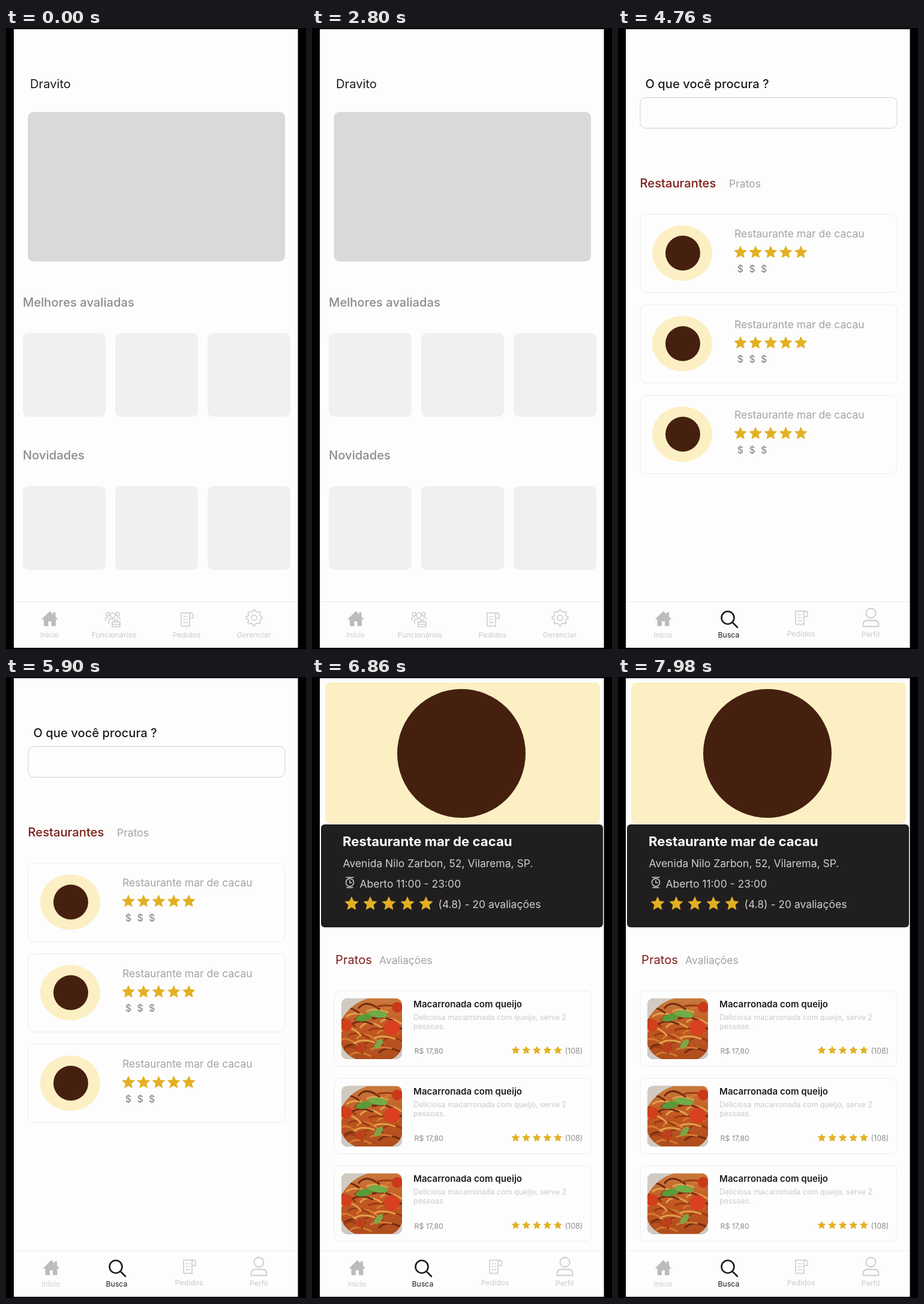
These frames come from a looping animation (500 px wide and 1032 px high, 8000 ms). An HTML page:

```html
<!DOCTYPE html>
<html lang="pt-BR">
<head>
<meta charset="utf-8">
<title>Aplicativo de restaurantes</title>
<style>
  html, body { margin: 0; width: 100%; height: 100%; overflow: hidden; background: #000; }
  svg { display: block; width: 500px; height: 1032px; }
  text { font-family: Inter, "Open Sans", sans-serif; }
</style>
</head>
<body>
<svg id="stage" viewBox="0 0 500 1032"></svg>
<script>
const INK = '#1c1c1c', GRAY = '#8c8c8c', SOFT = '#a3a3a3', PALE = '#cacaca';
const LINE = '#ebebeb', GOLD = '#e2b022', SILVER = '#cfcfcf', CREAM = '#fcefc3';
const LOGO = '#45200f', RED = '#7c1f18';
const PLACE = 'Restaurante mar de cacau';

const text = (x, y, s, size, fill, weight = 400, anchor = 'start') =>
  `<text x="${x}" y="${y}" font-size="${size}" fill="${fill}" font-weight="${weight}" text-anchor="${anchor}">${s}</text>`;
const box = (x, y, w, h, fill, stroke = 'none', r = 9) =>
  `<rect x="${x}" y="${y}" width="${w}" height="${h}" rx="${r}" fill="${fill}" stroke="${stroke}"/>`;
const circle = (x, y, r, fill) => `<circle cx="${x}" cy="${y}" r="${r}" fill="${fill}"/>`;
const group = (x, y, body) => `<g transform="translate(${x} ${y})">${body}</g>`;
const outline = (d, stroke, width = 1.5) =>
  `<path d="${d}" fill="none" stroke="${stroke}" stroke-width="${width}" stroke-linecap="round" stroke-linejoin="round"/>`;
const ring = (x, y, r) => `M${x - r} ${y}a${r} ${r} 0 1 1 ${2 * r} 0a${r} ${r} 0 1 1 ${-2 * r} 0`;
const repeat = (n, f) => Array.from({ length: n }, (_, i) => f(i)).join('');

function star(x, y, r) {
  const points = repeat(10, i => {
    const a = i * Math.PI / 5, k = i % 2 ? r * 0.46 : r;
    return `${(x + k * Math.sin(a)).toFixed(1)},${(y - k * Math.cos(a)).toFixed(1)} `;
  });
  return `<polygon points="${points}" fill="${GOLD}" stroke="${GOLD}" stroke-linejoin="round"/>`;
}
const stars = (x, y, step, r) => repeat(5, i => star(x + i * step, y, r));

function gear() {
  const points = repeat(48, i => {
    const a = i * Math.PI / 24, r = 11.8 + 1.8 * Math.tanh(2 * Math.cos(8 * a));
    return `${i ? 'L' : 'M'}${(r * Math.cos(a)).toFixed(1)} ${(r * Math.sin(a)).toFixed(1)}`;
  });
  return outline(points + 'Z' + ring(0, 0, 4.5), PALE);
}

const house = '<path d="M-13 1L0-12L6-6V-10H9V-3L13 1H9.500V12H3V4H-3V12H-9.500V1Z" fill="#bcbcbc" stroke="#bcbcbc" stroke-linejoin="round"/>';
const receipt = outline('M-9-11H7Q11-11 11-7V-2H5V12L2 10L-1 12L-4 10L-7 12L-9 10ZM5-2V-8Q5-11 8-11M-5-5H-3M0-5H1M-5 0H-3M0 0H1M-5 5H1', PALE);
const search = outline(ring(-2, -2, 10.5) + 'M6 6L14 14', INK, 2.6);
const person = outline(ring(0, -7, 8) + 'M-13 15V12Q-13 5-6 5H6Q13 5 13 12V15Z', PALE, 1.8);
const team = outline(ring(0, -6, 4) + ring(-8, -8, 3) + ring(8, -8, 3) +
  'M-7 8V4Q-7 0-3 0H3M-12 3V0Q-12-3-8-3M8-3Q12-3 12 1M-1 5H12V13H-1ZM3 5V2H8V5M-1 9H12', PALE);

const label = (x, y, s, fill = PALE) => text(x, y, s, 12.3, fill, 400, 'middle');
const rule = `<path d="M14 953.500H486" stroke="${LINE}"/>`;

const homeNav = rule +
  group(73, 981.5, house) + group(178, 982, team) + group(301, 983, receipt) + group(413.5, 980, gear()) +
  label(72.5, 1013, 'Início') + label(180, 1013, 'Funcionários') +
  label(301, 1013, 'Pedidos') + label(413, 1013, 'Gerenciar');

const searchNav = rule +
  group(75.5, 981.5, house) + group(185, 982, search) + group(305, 980, receipt) + group(421.5, 979.5, person) +
  label(75, 1013, 'Início') + label(184.5, 1013, 'Busca', INK) +
  label(305, 1011, 'Pedidos') + label(421, 1012, 'Perfil');

const tiles = y => repeat(3, i => box(28 + 154 * i, y, 138, 139, '#f0f0ef'));

const home =
  text(40, 99.5, 'Dravito', 20.2, INK) +
  box(36.5, 139.5, 428.5, 248.5, '#d9d9d9') +
  text(28, 463, 'Melhores avaliadas', 20.2, GRAY, 500) + tiles(507) +
  text(28, 717, 'Novidades', 20.2, GRAY, 500) + tiles(761.5) + homeNav;

const place = i => group(0, 150.5 * i,
  box(37, 309.5, 428, 130, 'none', LINE) +
  `<ellipse cx="107" cy="374" rx="50" ry="46" fill="${CREAM}"/>` +
  circle(108, 374, 29, LOGO) +
  text(194, 348, PLACE, 17.5, SOFT) +
  stars(204, 373, 25.2, 10.5) +
  repeat(3, n => text(204 + 19.6 * n, 405.5, '$', 16, GRAY, 500, 'middle')));

const results =
  text(45.5, 99.5, 'O que você procura ?', 20.2, INK, 500) +
  box(37, 115.5, 428, 51, 'none', '#d0d0d0') +
  text(36.5, 264.5, 'Restaurantes', 20.2, RED, 500) +
  text(185, 264.5, 'Pratos', 17.6, SOFT) +
  repeat(3, place) + searchNav;

// Plate of pasta: a warm gradient with noodles, tomatoes and basil
const leaf = (x, y, rx, ry, turn, fill) =>
  `<ellipse rx="${rx}" ry="${ry}" fill="${fill}" transform="translate(${x} ${y}) rotate(${turn})"/>`;
const noodle = i => {
  const x = (i * 37) % 91, y = 12 + (i * 23) % 83;
  return outline(`M${x - 14} ${y}q12 ${-18 + i % 5 * 3} 34 ${i % 7 - 2}`,
    ['#e2a04c', '#9c3914', '#d47a30', '#702a10'][i % 4], 3);
};
const defs = `<defs>
  <linearGradient id="sauce" x2="0" y2="1"><stop stop-color="#c87a3c"/><stop offset=".5" stop-color="#c25722"/><stop offset="1" stop-color="#ad4d1c"/></linearGradient>
  <clipPath id="frame"><rect width="101" height="101" rx="10"/></clipPath>
  <g id="dish" clip-path="url(#frame)">
    <rect width="101" height="101" fill="url(#sauce)"/>
    ${repeat(30, noodle)}
    <path d="M0 0H45Q16 8 0 36ZM0 77Q6 94 24 101H0ZM101 82Q97 95 84 101H101Z" fill="#d0cac2"/>
    ${circle(84, 49, 13, '#d8401f')}${circle(8, 45, 10, '#d0401c')}${circle(93, 15, 9, '#cc381a')}${circle(32, 82, 8, '#bd401c')}
    ${leaf(38, 32, 14, 6, -12, '#5a9a3a')}${leaf(61, 26, 16, 6, 8, '#72ab48')}${leaf(62, 76, 10, 5, -50, '#7ba548')}
  </g></defs>`;

const dish = i => group(0, 145.4 * i,
  box(37, 521.5, 428, 125.5, 'none', LINE) +
  '<use href="#dish" x="49" y="534"/>' +
  text(169, 548.5, 'Macarronada com queijo', 15.1, INK, 600) +
  text(169, 569.5, 'Deliciosa macarronada com queijo, serve 2', 12.5, PALE) +
  text(169, 584.5, 'pessoas.', 12.5, PALE) +
  text(170.5, 626, 'R$ 17,80', 12.3, GRAY) +
  stars(339.5, 620.5, 17.6, 6.5) +
  text(421.5, 626, '(108)', 12.5, GRAY));

const menu =
  box(22, 9, 458, 235, CREAM) +
  circle(249, 127, 107, LOGO) +
  box(15, 245, 470, 171, '#211e20', 'none', 6) +
  text(51, 281, PLACE, 22.2, '#fdfdfd', 700) +
  text(51.5, 315.5, 'Avenida Nilo Zarbon, 52, Vilarema, SP.', 17.5, SILVER) +
  outline('M57 333H69M58 350H68' + ring(63, 341.5, 6.5) + 'M63 338V342H66', SILVER) +
  text(79.5, 349.5, 'Aberto 11:00 - 23:00', 17.5, SILVER) +
  stars(66, 377, 31, 11.5) +
  text(210.5, 383.5, '(4.8) - 20 avaliações', 17.5, SILVER) +
  text(39, 476.5, 'Pratos', 20.2, RED) +
  text(112, 476.5, 'Avaliações', 17.5, SOFT) +
  repeat(3, dish) + searchNav;

const stage = document.getElementById('stage');
stage.innerHTML = defs + box(13, 2, 473.5, 1028, '#fdfdfd', 'none', 0) +
  [home, results, menu].map(s => `<g class="screen" display="none">${s}</g>`).join('');
const screens = [...stage.querySelectorAll('.screen')];

const LOOP = 8000, CUTS = [3660, 6860];
let start;
function draw(now) {
  start ??= now;
  const t = (now - start) % LOOP;
  const current = CUTS.filter(cut => t >= cut).length;
  screens.forEach((s, i) => s.setAttribute('display', i === current ? 'inline' : 'none'));
  requestAnimationFrame(draw);
}
requestAnimationFrame(draw);
</script>
</body>
</html>
```
